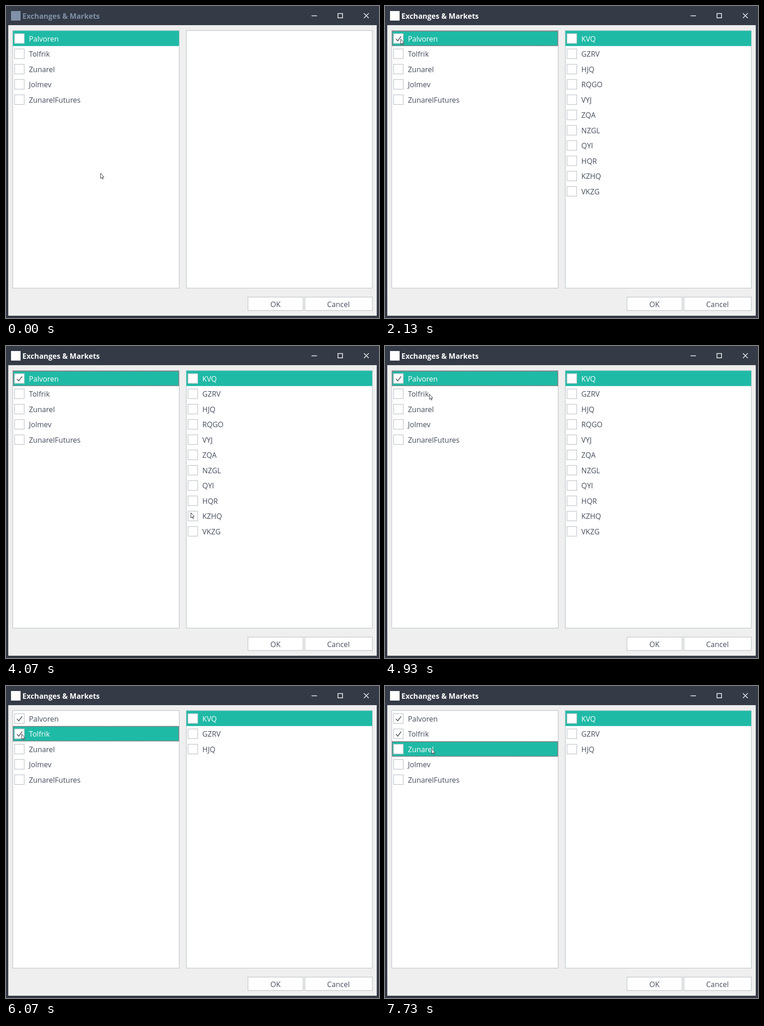
Recreate the animation shown at these times as an HTML page. Size 818x684 px, loop 8000 ms.

```html
<!DOCTYPE html>
<html lang="en">
<head>
<meta charset="utf-8">
<title>Exchanges &amp; Markets</title>
<style>
  html, body { margin: 0; width: 100%; height: 100%; overflow: hidden; background: #343a46; }
  svg { display: block; }
  text { font: 16px "Open Sans", "Noto Sans", sans-serif; fill: #454d5d; }
  .title { font-weight: 700; }
  .frame { fill: #fff; stroke: #c4c8ce; stroke-width: 1.4; }
  .bar { fill: #1fbaa6; }
  .focus { fill: none; stroke: #e04459; stroke-width: 1.3; stroke-dasharray: 1.9 1.5; }
  .check { fill: none; stroke: #454b57; stroke-width: 1.5; }
  .system { fill: none; stroke: #fff; stroke-width: 1.5; }
</style>
</head>
<body>
<svg id="stage" width="818" height="684" viewBox="0 0 818 684">
  <rect width="818" height="684" fill="#343a46"/>
  <rect x="5" y="42" width="808" height="637" fill="#efefef"/>
  <rect id="icon" x="11" y="11" width="21" height="21"/>
  <text id="title" class="title" x="36" y="27.5">Exchanges &amp; Markets</text>
  <path class="system" d="M670 21.5h12M728 16.5h10v9.500h-10zM785 16l10.500 10.500M795.500 16l-10.500 10.500"/>
  <rect class="frame" x="14.700" y="53.700" width="365.200" height="564.800"/>
  <rect class="frame" x="395.500" y="53.700" width="407.900" height="564.800"/>
  <rect class="frame" x="530.600" y="638.200" width="121" height="29.300"/>
  <rect class="frame" x="655.500" y="638.200" width="147.900" height="29.300"/>
  <text x="591" y="659.500" text-anchor="middle">OK</text>
  <text x="729" y="659.500" text-anchor="middle">Cancel</text>
  <g id="lists"></g>
  <path id="cursor" d="M.5 .5V12L3.100 9.600 4.800 13.500 6.300 12.900 4.600 9H8z"
        fill="#fff" stroke="#30343c" stroke-width="1" stroke-linejoin="round"/>
</svg>
<script>
const LOOP = 8000, TICKS_PER_MS = 0.015, PITCH = 33.5;
const $ = id => document.getElementById(id);

function add(parent, tag, attrs) {
  const el = document.createElementNS('http://www.w3.org/2000/svg', tag);
  for (const k in attrs) el.setAttribute(k, attrs[k]);
  return parent.appendChild(el);
}

function makeRow(name, i, x, width) {
  const g = add($('lists'), 'g', { transform: `translate(${x} ${54.3 + PITCH * i})` });
  const bar = add(g, 'rect', { class: 'bar', width, height: PITCH });
  const focus = add(g, 'rect', { class: 'focus', x: .7, y: .7, width: width - 1.4, height: PITCH - 1.4 });
  add(g, 'rect', { class: 'frame', x: 3.6, y: 6.4, width: 21.2, height: 21.2 });
  const check = add(g, 'path', { class: 'check', d: 'M8.800 17.700l4 4.500 7.400-10' });
  const label = add(g, 'text', { x: 35, y: 23.7 });
  label.textContent = name;
  return { g, bar, focus, check, label };
}

const show = (el, on) => { el.style.display = on ? '' : 'none'; };

function setRow(row, { visible = true, selected = false, focused = false, checked = false }) {
  show(row.g, visible);
  show(row.bar, selected);
  show(row.focus, focused);
  show(row.check, checked);
  row.label.style.fill = selected ? '#fff' : '';
}

const venues = ['Palvoren', 'Tolfrik', 'Zunarel', 'Jolmev', 'ZunarelFutures']
  .map((name, i) => makeRow(name, i, 15.2, 364.3));
const coins = ['KVQ', 'GZRV', 'HJQ', 'RQGO', 'VYJ', 'ZQA', 'NZGL', 'QYI', 'HQR', 'KZHQ', 'VKZG']
  .map((name, i) => makeRow(name, i, 395.6, 407.5));

const linear = p => p;
const smooth = p => p * p * (3 - 2 * p);
const easeOut = p => 1 - (1 - p) ** 2;

// Pointer stops: tick, x, y, easing of the move that ends there.
const path = [
  [0, 207, 366, linear], [7, 271, 657, smooth], [12, 271, 657, linear],
  [15, 168, 326, linear], [25, 35, 73, easeOut], [26, 34, 72, linear],
  [39, 34, 72, linear], [48, 411, 76, smooth], [52, 411, 118, smooth],
  [64, 404, 411, smooth], [65, 404, 411, linear], [74, 97, 105, smooth],
  [79, 97, 105, linear], [83, 42, 102, smooth], [84, 42, 102, linear],
  [87, 34, 105, smooth], [96, 34, 105, linear], [100, 424, 113, smooth],
  [103, 424, 113, linear], [113, 102, 137, smooth], [120, 102, 137, linear]
];

function pointerAt(tick) {
  const n = path.findIndex(stop => stop[0] > tick);
  const [t0, x0, y0] = path[n - 1], [t1, x1, y1, ease] = path[n];
  const p = ease((tick - t0) / (t1 - t0));
  return [x0 + (x1 - x0) * p, y0 + (y1 - y0) * p].map(Math.round);
}

function draw(tick) {
  const titleColor = tick < 10 ? '#8091a8' : '#fff';
  $('icon').style.fill = $('title').style.fill = titleColor;

  const current = tick < 76 ? 0 : tick < 116 ? 1 : 2;
  const checkTicks = [32, 91];
  venues.forEach((row, i) => setRow(row, {
    selected: i === current,
    focused: i === current && tick >= 11,
    checked: tick >= checkTicks[i]
  }));

  const count = tick < 32 ? 0 : tick < 91 ? coins.length : 3;
  coins.forEach((row, i) => setRow(row, { visible: i < count, selected: i === 0 }));

  $('cursor').setAttribute('transform', `translate(${pointerAt(tick)})`);
}

const start = performance.now();
let last = -1;
function loop(now) {
  const t = Math.max(0, now - start) % LOOP;
  const tick = Math.min(119, Math.floor(t * TICKS_PER_MS + .06));
  if (tick !== last) draw(last = tick);
  requestAnimationFrame(loop);
}
draw(0);
requestAnimationFrame(loop);
</script>
</body>
</html>
```
